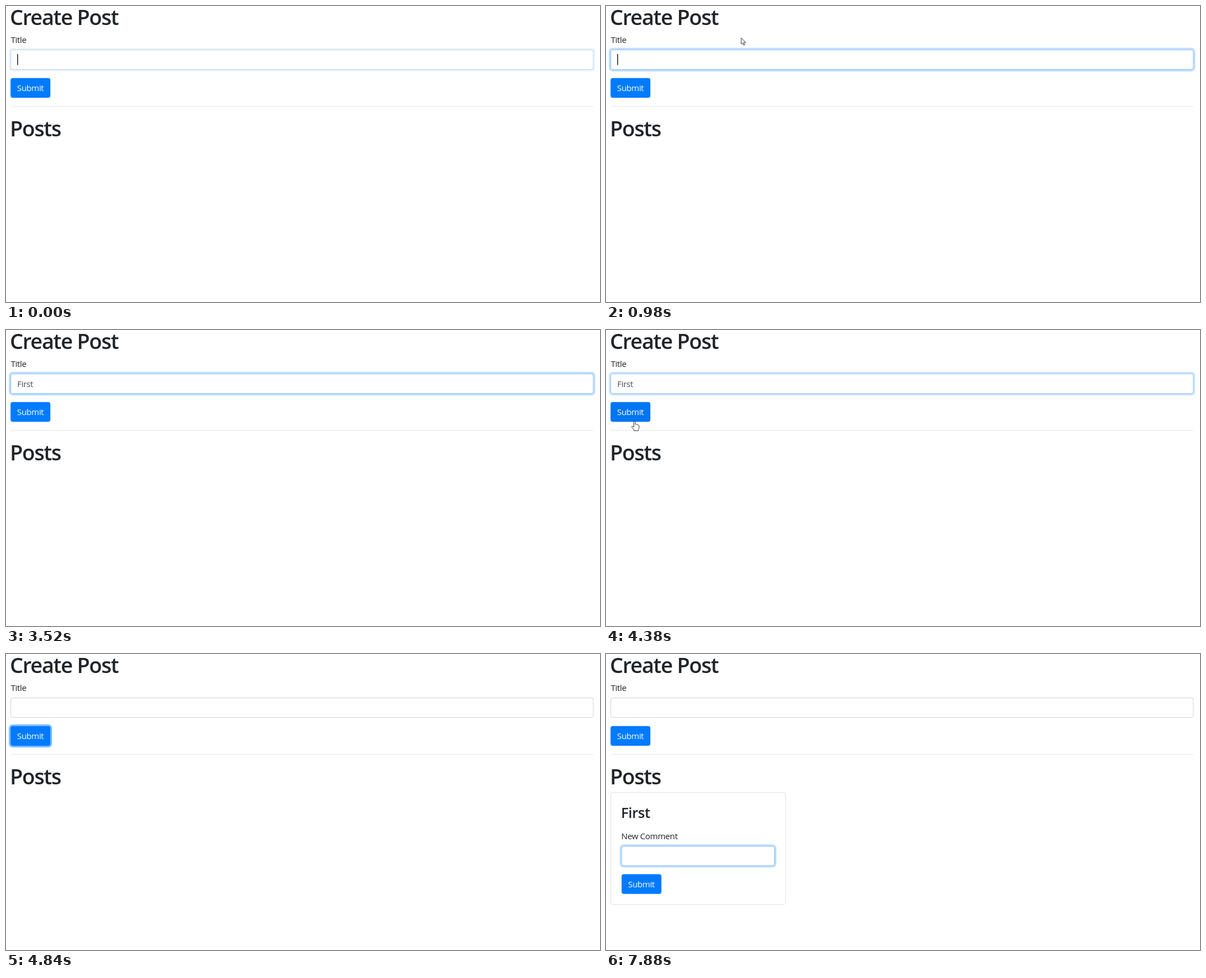
Recreate the animation shown at these times as an HTML page. Size 1059x529 px, loop 8 s.

```html
<!DOCTYPE html>
<html lang="en">
<head>
<meta charset="utf-8">
<title>Create Post</title>
<style>
  html, body { margin: 0; width: 100%; height: 100%; overflow: hidden; background: #fff; }
  svg { display: block; width: 100%; height: 100%; }
  text { font-family: "Open Sans", "Noto Sans", sans-serif; font-size: 15px; letter-spacing: -.36px; fill: #212529; }
  .h1 { font-size: 37.5px; font-weight: 600; letter-spacing: -1.3px; }
  .h3 { font-size: 25.5px; font-weight: 600; letter-spacing: -.5px; }
  .value { fill: #495057; }
  .light { fill: #fff; }
  .field { fill: #fff; }
  .glow { fill: none; stroke: #007bff; stroke-width: 3; }
  .card { fill: #fff; stroke: #dfdfdf; }
  .caret { fill: #111; }
  .pointer { fill: #fff; stroke: #222; stroke-width: .9; stroke-linejoin: round; }
</style>
</head>
<body>
<svg viewBox="0 0 1059 529">
  <text class="h1" x="7" y="33.5">Create Post</text>
  <text x="8.5" y="65.5">Title</text>
  <rect id="titleGlow" class="glow" x="6.5" y="76.3" width="1042.5" height="39.2" rx="5.5"/>
  <rect id="titleField" class="field" x="8.5" y="78.3" width="1038.5" height="35.2" rx="3.5"/>
  <text id="typed" class="value" x="20" y="102"></text>
  <rect id="titleCaret" class="caret" y="86" width="1.4" height="19.5"/>
  <rect id="submitGlow" class="glow" x="6.6" y="127.2" width="74" height="38.4" rx="5.5"/>
  <rect id="submit" x="8.1" y="128.7" width="71" height="35.4" rx="4"/>
  <text class="light" x="19.8" y="152.2">Submit</text>
  <path d="M8 179.5H1047" stroke="#e6e6e6"/>
  <text class="h1" x="7" y="232.5">Posts</text>

  <g id="card">
    <rect class="card" x="8.5" y="247.5" width="311.7" height="200" rx="3.5"/>
    <text class="h3" x="26.8" y="293">First</text>
    <text x="27.2" y="330.5">New Comment</text>
    <rect id="commentGlow" class="glow" x="26" y="341.7" width="276.3" height="38.4" rx="5.5"/>
    <rect id="commentField" class="field" x="27.8" y="343.6" width="272.7" height="34.7" rx="3.5"/>
    <rect id="commentCaret" class="caret" x="39.8" y="351" width="1.4" height="19.5"/>
    <rect x="27.8" y="393.4" width="71" height="35.4" rx="4" fill="#007bff"/>
    <text class="light" x="39.3" y="417">Submit</text>
  </g>

  <path id="arrow" class="pointer" d="M0 0V11.3L2.7 8.8L4.5 13L6.3 12.2L4.5 8.2H8.1Z"/>
  <path id="hand" class="pointer" d="M-1.3 9V1.2Q-1.2 0 0 0T1.3 1.2V5.8Q2.7 5 3.8 6.3Q5.2 5.6 6.2 6.9Q8 6.6 8 8.5V12Q7.8 14 6.6 15V17H-1.2V15.3L-5 10.6Q-5.4 8.7-3.5 8.9L-1.3 10.8Z"/>
</svg>
<script>
const LOOP = 8000;
const $ = id => document.getElementById(id);
const ramp = (t, a, b) => Math.min(1, Math.max(0, (t - a) / (b - a)));
const within = (t, a, b) => t >= a && t < b;
const show = (id, on) => $(id).setAttribute("visibility", on ? "visible" : "hidden");
const mix = (a, b, k) => `rgb(${a.map((v, i) => Math.round(v + (b[i] - v) * k))})`;

const GREY = [206, 212, 218], FOCUS = [128, 189, 255];
const BLUE = [0, 123, 255], HOVER = [0, 105, 217];

// [time typed, caret x afterwards]
const KEYS = [[1950, 28.2], [2370, 31.2], [2620, 36.8], [2950, 43], [3020, 47.6]];

// Pointer tracks: [time, x, y]
const TRACKS = [
  [[740, 260, 84], [800, 261, 66], [860, 258, 50], [920, 248, 53], [980, 241, 57], [3020, 241, 57]],
  [[3760, 238, 60], [3900, 190, 82], [4040, 128, 118], [4170, 78, 160], [4270, 56, 178],
   [4380, 51, 163], [4450, 50, 159], [4600, 50, 159], [4680, 36, 105], [4760, 12, 40],
   [4840, -6.4, -12], [6740, -6.4, -12], [6810, 22, 50], [6870, 74, 180], [6930, 122, 304], [6990, 128, 350]]
];

function pointerAt(t) {
  const track = TRACKS.find(p => within(t, p[0][0], p[p.length - 1][0]));
  if (!track) return null;
  const i = track.findIndex(p => p[0] > t);
  const [a, x0, y0] = track[i - 1], [b, x1, y1] = track[i];
  const k = ramp(t, a, b);
  return [x0 + (x1 - x0) * k, y0 + (y1 - y0) * k];
}

function setFocus(name, k) {
  $(name + "Field").setAttribute("stroke", mix(GREY, FOCUS, k));
  $(name + "Glow").setAttribute("opacity", .25 * k);
}

function drawPointer(t) {
  const p = pointerAt(t);
  const [x, y] = p || [0, 0];
  const inField = within(y, 78, 114) || (y > 343 && t > 6580);
  const onButton = within(x, 8, 79) && within(y, 128, 165);
  show("arrow", p && !inField && !onButton);
  show("hand", p && onButton);
  for (const id of ["arrow", "hand"]) $(id).setAttribute("transform", `translate(${x} ${y})`);
}

function draw(t) {
  const count = KEYS.filter(k => t >= k[0]).length;
  $("typed").textContent = t < 4540 ? "First".slice(0, count) : "";
  $("titleCaret").setAttribute("x", count ? KEYS[count - 1][1] : 20);
  show("titleCaret", t < 420 || within(t, 920, 1480) || within(t, 1950, 3520) || within(t, 4020, 4340));

  const gain = t < 120 ? .3 : .3 + .7 * ramp(t, 70, 170);
  setFocus("title", gain * (1 - ramp(t, 4350, 4520)));
  setFocus("comment", ramp(t, 7360, 7550));

  const hover = ramp(t, 4320, 4500) * (1 - ramp(t, 4650, 4830));
  $("submit").setAttribute("fill", mix(BLUE, HOVER, hover));
  $("submitGlow").setAttribute("opacity", t < 6580 ? .5 * ramp(t, 4390, 4540) : 0);

  $("card").style.display = t >= 6580 ? "" : "none";
  show("commentCaret", within(t, 7400, 7880));
  drawPointer(t);
}

const start = performance.now();
function tick() {
  draw((performance.now() - start) % LOOP);
  requestAnimationFrame(tick);
}
tick();
</script>
</body>
</html>
```
